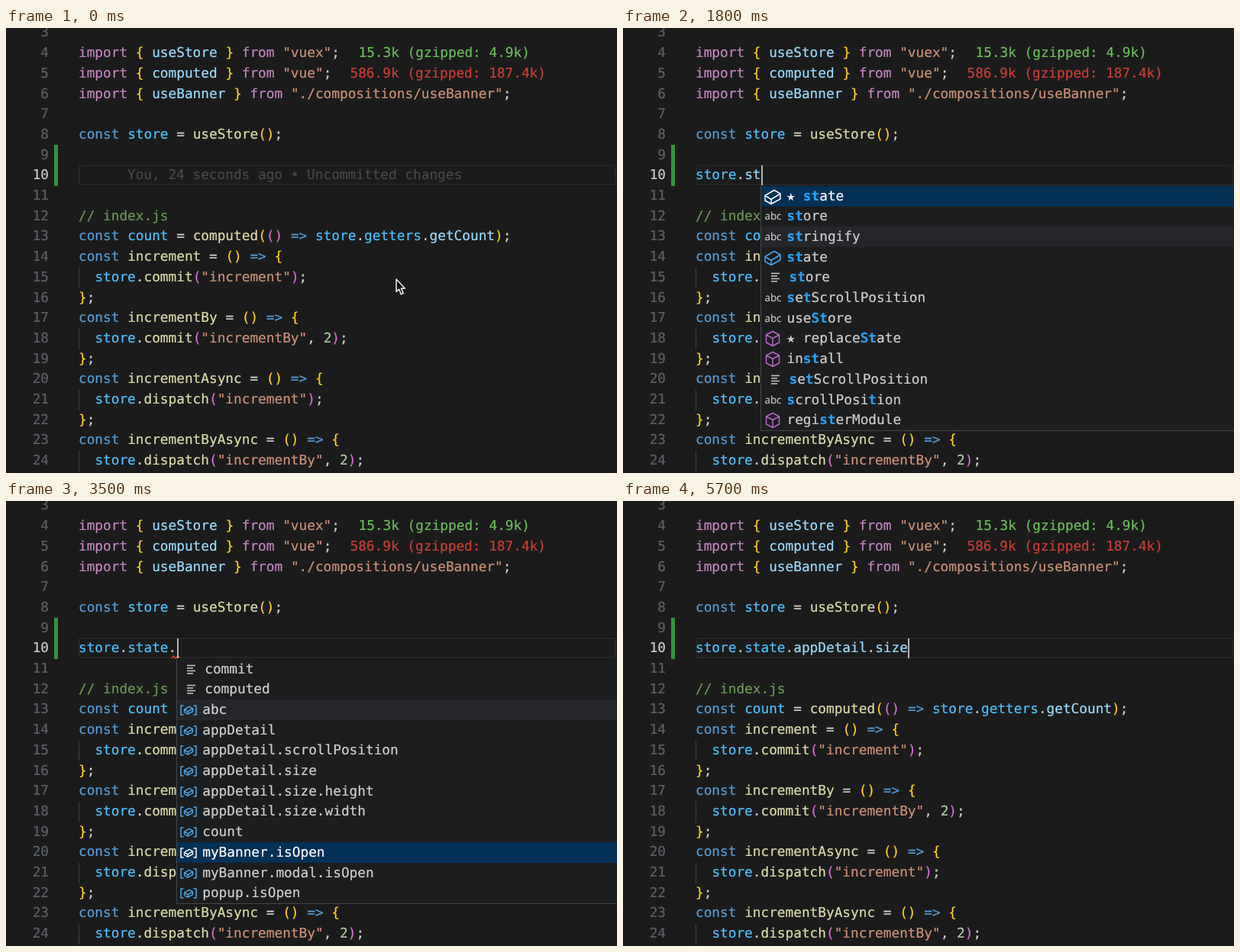
Animation of 800 by 583 pixels, one loop 6100 ms. Source, as an HTML page:

```html
<!DOCTYPE html>
<html lang="en">
<head>
<meta charset="utf-8">
<title>Editor completion</title>
<style>
html, body { margin: 0; width: 100%; height: 100%; overflow: hidden; background: #1b1b1c; }
#stage {
  position: relative; width: 800px; height: 583px; overflow: hidden;
  background: #1b1b1c; color: #d0d0d0;
  font: 17.75px/26.7px "DejaVu Sans Mono", monospace;
  text-rendering: geometricPrecision; font-variant-ligatures: none;
  -webkit-text-stroke: .2px currentColor;
}
#stage div, #stage svg { position: absolute; white-space: pre; }
svg { overflow: visible; fill: none; stroke: currentColor; stroke-width: 1.5; stroke-linejoin: round; }
.num { right: 744px; color: #5c6168; }
.num.on { color: #cccccc; }
.code { left: 95px; }
.guide { left: 95px; width: 1px; height: 26.7px; background: #404041; }
.k { color: #569cd6; } .m { color: #c586c0; } .v { color: #4fc1ff; } .i { color: #9cdcfe; }
.f { color: #dcdcaa; } .s { color: #ce9178; } .c { color: #6a9955; } .n { color: #b5cea8; }
.y { color: #ffd21a; } .u { color: #da70d6; } .p { color: #d0d0d0; }
.g { color: #6cbd5c; } .r { color: #cb3f36; }
#bar { left: 63px; top: 153px; width: 5px; height: 53.6px; background: #37923d; }
#row { left: 95px; top: 179.3px; width: 704px; height: 26.7px; box-sizing: border-box; border: 2px solid #252526; }
#blame { left: 159px; top: 180.3px; color: #45484b; }
#caret { top: 180px; width: 2px; height: 26px; background: #b4b4b4; }
.popup { top: 207px; width: 638px; height: 320.4px; border: 1px solid #434446; border-top-width: 0; background: #1c1d1e; }
.item { left: 0; width: 100%; height: 26.7px; }
.item.hover { background: #25262a; }
.item.sel { background: #033056; color: #fff; }
.item b { color: #2b9ff3; }
.label { left: 33px; top: .6px; }
.side { right: 15px; top: .6px; font-size: 15.3px; color: #8b8b8b; }
.item svg { left: 15px; top: 13.6px; width: 1px; height: 1px; color: var(--tint); }
.item.sel svg { color: #fff; }
.abc { left: 4px; top: .6px; font: 13.4px/25.5px "Open Sans", sans-serif; color: #c8c8c8; }
.thumb { right: 0; top: 0; width: 15px; height: 29px; background: rgba(121,121,121,.4); }
.doc { left: 638px; top: 0; width: 300px; height: 54px; border: 1px solid #434446; background: #1c1d1e; }
.doc div { left: 8px; top: 6px; }
</style>
</head>
<body>
<div id="stage"></div>
<script>
const LOOP = 6100, LEFT = 95, CHAR = 17.75 * 0.602, ROW = 26.7;
const stage = document.getElementById('stage');
const rowTop = n => 153.6 + (n - 9) * ROW;

function add(parent, cls, html = '', style = '') {
  const el = document.createElement('div');
  el.className = cls;
  el.innerHTML = html;
  el.style.cssText = style;
  parent.append(el);
  return el;
}

// Each segment is a colour letter followed by its text.
const paint = line => line.split('|').map(s => `<span class="${s[0]}">${s.slice(1)}</span>`).join('');
const imp = (name, from) => `mimport |y{ |i${name} |y} |mfrom |s"${from}"|p;`;
const arrow = name => `kconst |f${name} |p= |y() |k=&gt; |y{`;
const call = (fn, arg, more = '') => `p  |vstore|p.|f${fn}|u(|s"${arg}"${more}|u)|p;`;
const two = '|p, |n2', end = 'y}|p;';

const code = {
  4: imp('useStore', 'vuex'),
  5: imp('computed', 'vue'),
  6: imp('useBanner', './compositions/useBanner'),
  8: 'kconst |vstore |p= |fuseStore|y()|p;',
  12: 'c// index.js',
  13: 'kconst |vcount |p= |fcomputed|y(|u() |k=&gt; |vstore|p.|vgetters|p.|igetCount|y)|p;',
  14: arrow('increment'), 15: call('commit', 'increment'), 16: end,
  17: arrow('incrementBy'), 18: call('commit', 'incrementBy', two), 19: end,
  20: arrow('incrementAsync'), 21: call('dispatch', 'increment'), 22: end,
  23: arrow('incrementByAsync'), 24: call('dispatch', 'incrementBy', two)
};

for (let n = 3; n <= 24; n++) {
  const top = `top:${rowTop(n)}px`;
  add(stage, n === 10 ? 'num on' : 'num', n, top);
  if (code[n]) add(stage, 'code', paint(code[n]), top);
  if (n >= 15 && n % 3 === 0) add(stage, 'guide', '', top);
}
add(stage, 'g', '15.3k (gzipped: 4.9k)', `left:461.5px;top:${rowTop(4)}px`);
add(stage, 'r', '586.9k (gzipped: 187.4k)', `left:450.5px;top:${rowTop(5)}px`);
add(stage, '').id = 'bar';
add(stage, '').id = 'row';
const blame = add(stage, '', 'You, 24 seconds ago • Uncommitted changes');
blame.id = 'blame';
const typed = add(stage, 'code', '', `top:${rowTop(10)}px`);
const squiggle = add(stage, '',
  '<svg width="10" height="6"><path d="M0 4l2-3 3 3 3-3 2 2" stroke="#e0483e"/></svg>',
  'left:217px;top:202px');
const caret = add(stage, '');
caret.id = 'caret';

const brick = 'M-10-1.5L2-8.5 10-4V3L-2 9.5-10 5ZM-10-1.5L-2 3.5 10-4M-2 3.5V9.5';
const icons = {
  v: ['#4ba6ec', `<path d="M-6.5-6H-10V6H-6.5M6.5-6H10V6H6.5"/><path d="${brick}" transform="scale(.55)" stroke-width="2.5"/>`],
  w: ['#c8c8c8', '<path d="M9-6A5.5 5.5 0 0 1 1.5 0L-6 8.5A2.2 2.2 0 0 1-9.2 5.3L-1.2-2A5.5 5.5 0 0 1 5-9L2-5.5 5.5-2.5Z"/>'],
  m: ['#b966c9', '<path d="M0-9.5L8.5-5V5L0 9.5-8.5 5V-5ZM-8.5-5L0-.5 8.5-5M0-.5V9.5"/>'],
  f: ['#4ba6ec', `<path d="${brick}"/>`],
  t: ['#c8c8c8', '<path d="M-2-5.5H9M-2-2H6M-2 1.5H9M-2 5H6"/>']
};

function icon(kind) {
  if (kind === 'a') return '<div class="abc">abc</div>';
  const [color, shape] = icons[kind];
  return `<svg style="--tint:${color}">${shape}</svg>`;
}

// An entry is "<icon letter> label", matched letters in *stars*, origin after "@".
function popup(cols, entries) {
  const box = add(stage, 'popup', '', `left:${LEFT + cols * CHAR}px`);
  box.items = entries.split(',').map((entry, i) => {
    const [text, origin] = entry.slice(2).split('@');
    const shift = entry[0] === 't' ? 'left:36px' : '';
    const label = text.replace(/\*(\w+)\*/g, '<b>$1</b>');
    return add(box, 'item', icon(entry[0]) + `<div class="label" style="${shift}">${label}</div>` +
      (origin ? `<div class="side">${origin}</div>` : ''), `top:${i * ROW}px`);
  });
  return box;
}

const popups = {
  st: popup(2, 'v *st*ore,w *st*ore,v *st*atusbar,m *st*op,m *st*ructuredClone,v *st*atusbar,m *st*op,' +
    'm *st*ructuredClone,v *st*op@vue,v *st*oreKey@vuex,w *st*op,w *st*oreKey'),
  member: popup(8, 'f ★ *st*ate,a *st*ore,a *st*ringify,f *st*ate,t *st*ore,a *s*e*t*ScrollPosition,' +
    'a use*St*ore,m ★ replace*St*ate,m in*st*all,t *s*e*t*ScrollPosition,a *s*crollPosi*t*ion,m regi*st*erModule'),
  words: popup(12, 'a ComponentPublicInstance,a JSON,a abc,a abc1,a abc2,a appDetail,a br,a button,a class,' +
    'a closeBanner,a closeModal,a closeModalAsync'),
  state: popup(12, 't commit,t computed,v abc,v appDetail,v appDetail.scrollPosition,v appDetail.size,' +
    'v appDetail.size.height,v appDetail.size.width,v count,v myBanner.isOpen,v myBanner.modal.isOpen,v popup.isOpen')
};
add(popups.st, 'thumb');
add(popups.st, 'doc', '<div>const store</div>');

const mouse = add(stage, '',
  '<svg width="14" height="24"><path d="M1 1V17.5L4.6 14.2 7.2 20.8 10.2 19.6 7.5 13.2H12.3Z" fill="#111" stroke="#f2f2f2"/></svg>',
  'left:510px;top:328px');

// time, typed text, popup, selected row
const store = 'vstore', dot = store + '|p.', state = dot + '|vstate', full = state + '|p.';
const steps = [
  [0, ''],
  [700, 'is'],
  [800, 'ist'],
  [900, 'ist', 'st', 0],
  [1300, store],
  [1400, dot],
  [1600, dot + '|is'],
  [1700, dot + '|ist', 'member', 0],
  [2000, state],
  [2200, full],
  [2300, full, 'words', 0],
  [3200, full, 'state', 11],
  [3300, full, 'state', 10],
  [3500, full, 'state', 9],
  [3600, full, 'state', 8],
  [3800, full, 'state', 7],
  [4100, full, 'state', 6],
  [4300, full, 'state', 5],
  [4600, full + '|iappDetail|p.|isize']
];

const show = (el, on) => { el.style.visibility = on ? 'visible' : 'hidden'; };
let last;

function draw(t) {
  show(squiggle, t >= 2700 && t < 4600);
  const step = steps.filter(s => s[0] <= t).pop();
  if (step === last) return;
  last = step;
  const [, text, open, sel] = step;
  typed.innerHTML = text && paint(text);
  caret.style.left = LEFT + 0.6 + typed.textContent.length * CHAR + 'px';
  show(caret, text);
  show(blame, !text);
  show(mouse, !text);
  for (const name in popups) {
    show(popups[name], name === open);
    popups[name].items.forEach((el, i) => {
      el.className = 'item' + (i === sel ? ' sel' : i === 2 ? ' hover' : '');
    });
  }
}

const start = performance.now();
function tick() {
  draw((performance.now() - start) % LOOP);
  requestAnimationFrame(tick);
}
tick();
</script>
</body>
</html>
```
